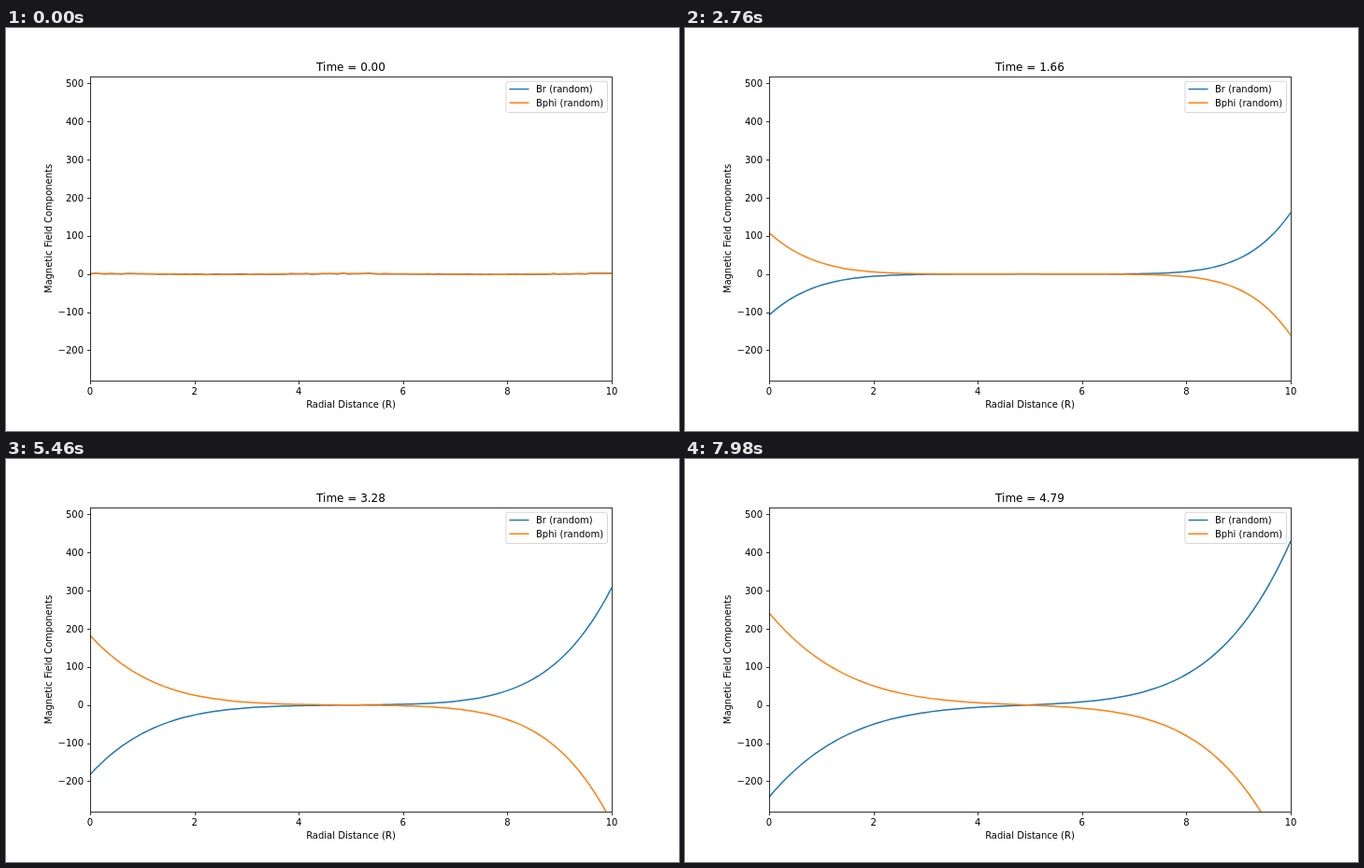
These frames come from a looping animation (720x432 px, 8 s). An HTML page:

```html
<!DOCTYPE html>
<html lang="en">
<head>
<meta charset="utf-8">
<title>Magnetic field components</title>
<style>
  html, body { margin: 0; width: 100%; height: 100%; overflow: hidden; background: #fff; }
  svg { display: block; width: 720px; height: 432px; }
  text { font: 10px "DejaVu Sans", sans-serif; fill: #000; }
  #title { font-size: 12px; }
  .mid { text-anchor: middle; }
  .end { text-anchor: end; }
  .axis { fill: none; stroke: #000; stroke-width: .8; }
  .line { fill: none; stroke-width: 1.5; stroke-linejoin: round; }
  .br { stroke: #1f77b4; }
  .bphi { stroke: #ff7f0e; }
</style>
</head>
<body>
<svg viewBox="0 0 720 432">
  <clipPath id="plot"><rect x="90" y="52" width="558" height="326"/></clipPath>
  <g clip-path="url(#plot)">
    <polyline id="br" class="line br"/>
    <polyline id="bphi" class="line bphi"/>
  </g>
  <g id="ticks"></g>
  <rect class="axis" x="90.5" y="52.5" width="558" height="326"/>
  <text id="title" class="mid" x="369" y="46"></text>
  <text class="mid" x="369" y="407">Radial Distance (R)</text>
  <text class="mid" transform="translate(49 215) rotate(-90)">Magnetic Field Components</text>
  <rect x="535" y="57.3" width="108.5" height="33.2" rx="2" fill="#fff" fill-opacity=".8" stroke="#ccc" stroke-opacity=".8"/>
  <path class="line br" d="M538.5 65.5h21"/>
  <path class="line bphi" d="M538.5 80.2h21"/>
  <text x="567" y="69">Br (random)</text>
  <text x="567" y="83.7">Bphi (random)</text>
</svg>
<script>
const STEP = 20, STEPS = 400, DT = 0.012, N = 100;
const $ = id => document.getElementById(id);
const px = r => 90 + r * 55.8;
const py = b => 263.75 - b * 0.4087;
const snap = v => Math.round(v) + 0.5;

function drawTicks() {
  let out = '';
  for (let r = 0; r <= 10; r += 2) {
    out += `<path class="axis" d="M${snap(px(r))} 378.5v3.5"/><text class="mid" x="${px(r)}" y="393">${r}</text>`;
  }
  for (let b = -200; b <= 500; b += 100) {
    const y = py(b), label = String(b).replace('-', '\u2212');
    out += `<path class="axis" d="M90.5 ${snap(y)}h-3.5"/><text class="end" x="83" y="${Math.round(y + 3.5)}">${label}</text>`;
  }
  $('ticks').innerHTML = out;
}

let seed = 7;
function random() {
  seed = (seed * 16807) % 2147483647;
  return seed / 2147483647 - 0.5;
}
const noise = () => Array.from({ length: N }, random);
const noiseR = noise(), noisePhi = noise();

function erfc(z) {
  const k = 1 / (1 + 0.3275911 * z);
  const p = ((((1.061405429 * k - 1.453152027) * k + 1.421413741) * k - 0.284496736) * k + 0.254829592) * k;
  return p * Math.exp(-z * z);
}

// Diffusion inward from an edge whose value grows with time
function spread(dist, diff, t) {
  const z = dist / (2 * Math.sqrt(diff * t));
  return (1 + 2 * z * z) * erfc(z) - 2 * z / Math.sqrt(Math.PI) * Math.exp(-z * z);
}
const leftEdge = t => t * (72.2 - 13.9 * Math.log(t));
const rightEdge = t => t * (106.57 - 3.21 * t) - 6.7 * (1 - Math.exp(-4 * t));

function render(step) {
  const t = step * DT;
  const wave = 1.2 * Math.exp(-0.8 * t), rough = Math.exp(-8 * t);
  const left = t && leftEdge(t), right = t && rightEdge(t);
  const br = [], bphi = [];
  for (let i = 0; i < N; i++) {
    const r = 10 * i / (N - 1);
    const grow = t && right * spread(10 - r, 0.515, t) - left * spread(r, 0.58, t);
    const base = wave * Math.cos(0.4 * Math.PI * r);
    const x = px(r).toFixed(2);
    br.push(x + ',' + py(grow + base * 0.7 + 2 * rough * noiseR[i]).toFixed(2));
    bphi.push(x + ',' + py(-grow + base + 0.4 * rough * noisePhi[i]).toFixed(2));
  }
  $('br').setAttribute('points', br.join(' '));
  $('bphi').setAttribute('points', bphi.join(' '));
  $('title').textContent = 'Time = ' + t.toFixed(2);
}

let start, shown = -1;
function tick(now) {
  start ??= now;
  const step = Math.floor((now - start) / STEP) % STEPS;
  if (step !== shown) render(shown = step);
  requestAnimationFrame(tick);
}

drawTicks();
render(0);
requestAnimationFrame(tick);
</script>
</body>
</html>
```
